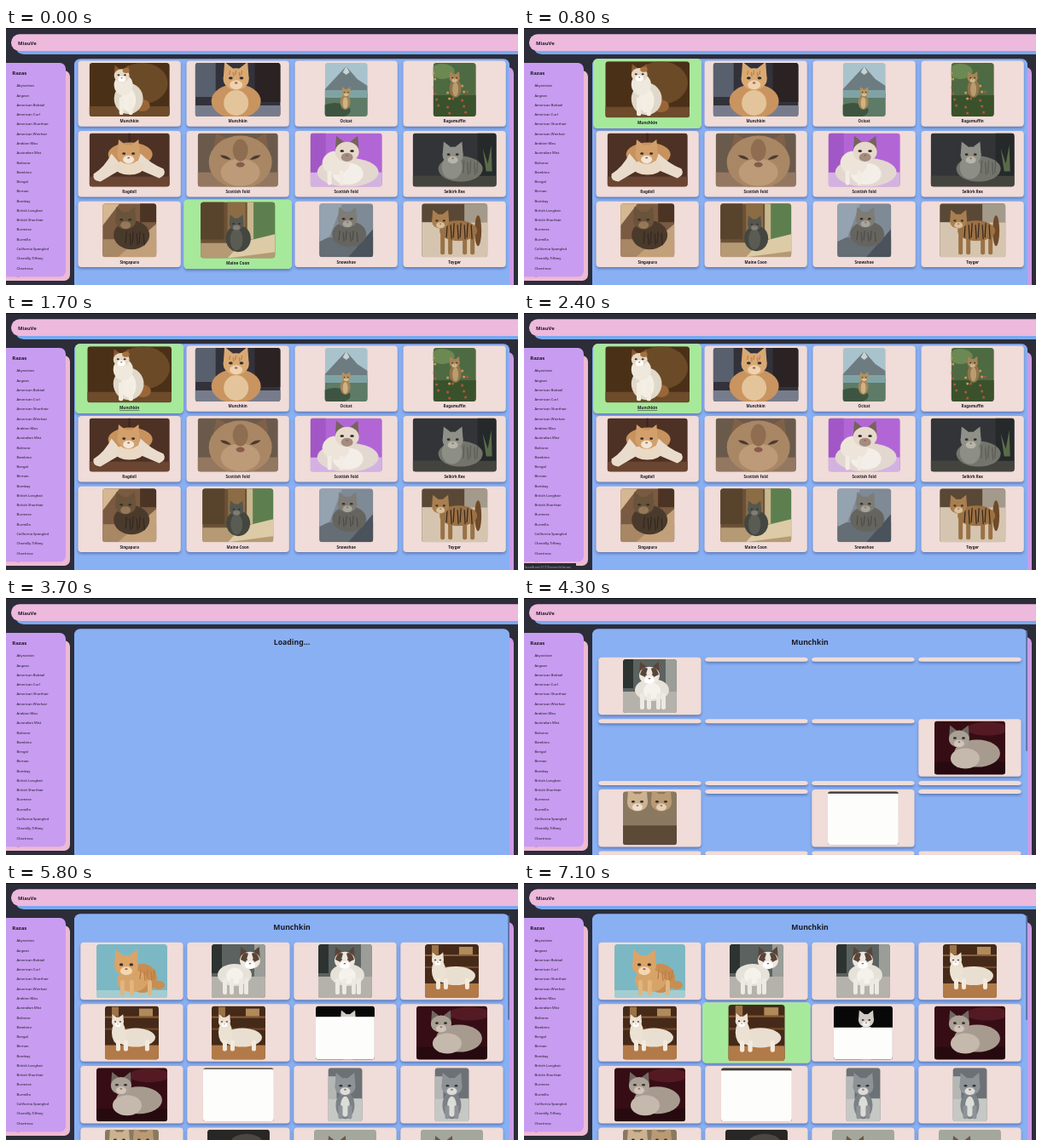
Recreate the animation shown at these times as an HTML page. Size 600 px wide and 302 px high, loop 8 s.

```html
<!DOCTYPE html>
<html lang="es">
<head>
<meta charset="utf-8">
<title>MiauVe</title>
<style>
  html, body { margin: 0; width: 100%; height: 100%; overflow: hidden; background: #2c2d39; }
  svg { display: block; width: 600px; height: 302px; font-family: "Noto Sans", "Open Sans", sans-serif; fill: #1b1a24; }
  .shadow { filter: drop-shadow(0 2px 1.6px rgba(30, 45, 100, .4)); }
  .label { font-size: 4.45px; font-weight: 600; text-anchor: middle; }
  .title { font-size: 8.7px; font-weight: 700; text-anchor: middle; }
  .breed { font-size: 4.1px; }
</style>
</head>
<body>
<svg id="stage" viewBox="0 0 600 302">
  <defs id="defs"></defs>
  <g id="frame"></g>
  <g id="view"></g>
</svg>
<script>
const PHOTO_H = 63;
const $ = id => document.getElementById(id);
const clamp = v => Math.max(0, Math.min(1, v));
const ease = (t, start, len = 200) => {
  const k = clamp((t - start) / len);
  return k * k * (3 - 2 * k);
};

const rect = (x, y, w, h, fill, r = 0, extra = '') =>
  `<rect x="${x}" y="${y}" width="${w}" height="${h}" rx="${r}" fill="${fill}" ${extra}/>`;
const oval = (fill, x, y, rx, ry = rx) =>
  `<ellipse cx="${x}" cy="${y}" rx="${rx}" ry="${ry}" fill="${fill}"/>`;
const shape = (fill, d) => `<path d="${d}" fill="${fill}"/>`;
const text = (x, y, s, cls, extra = '') => `<text x="${x}" y="${y}" class="${cls}" ${extra}>${s}</text>`;

// A wall down to the given height, then a floor
const room = (wall, floor, y) => rect(0, 0, 100, 63, wall) + rect(0, y, 100, 63 - y, floor);

const stripes = (color, x, y, n, step, len) => {
  let d = '';
  for (let i = 0; i < n; i++) d += `M${x + i * step} ${y + i % 2 * 2}l${i % 2 ? 1 : -1} ${len}`;
  return `<path d="${d}" stroke="${color}" stroke-width="1.3" fill="none"/>`;
};

const head = (fur, light, x, y, r, ear = fur) =>
  shape(ear, `M${x - r} ${y}l${r * .1} ${-r * 1.35}l${r * .75} ${r * .6}zM${x + r} ${y}l${-r * .1} ${-r * 1.35}l${-r * .75} ${r * .6}z`) +
  oval(fur, x, y, r, r * .85) +
  oval(light, x, y + r * .45, r * .5, r * .36) +
  oval('#36302a', x - r * .42, y - r * .08, r * .16, r * .11) +
  oval('#36302a', x + r * .42, y - r * .08, r * .16, r * .11) +
  oval('#a06b60', x, y + r * .3, r * .12, r * .08);

const body = (fur, light, x, y, rx, ry) =>
  oval(fur, x, y, rx, ry) + oval(light, x, y + ry * .1, rx * .5, ry * .75);

const legs = (fur, y, len, ...xs) => xs.map(x => rect(x, y, 5, len, fur, 2)).join('');

const blooms = (color, n, y) => Array.from({ length: n }, (_, i) =>
  oval(color, i * 17 % 49, y + i * 23 % 31, 1.6)).join('');

const whiteCat = (x, bodyX) => room('#5b625f', '#b5b2ab', 38) +
  rect(0, 0, 12, 34, '#2c3330') + rect(50, 0, 13, 38, '#9a9d98') +
  body('#e6e2da', '#f5f2ec', bodyX, 36, 20, 13) + legs('#eeeae2', 40, 19, bodyX - 14, bodyX - 6, bodyX + 5, bodyX + 11) +
  head('#ece7df', '#fff', x, 19, 12, '#594538') +
  shape('#594538', `M${x - 11} 18q3 -11 9 -7l-3 10zM${x + 11} 18q-3 -11 -9 -7l3 10z`);

// Each photo: width, then its drawing
const photos = {
  calicoSit: [94, room('#4b3018', '#6d4b2b', 51) + oval('#6b4a27', 62, 24, 30, 24) +
    oval('#9a6638', 62, 50, 9, 7) + body('#e0d8ca', '#f4efe4', 46, 42, 17, 18) + oval('#efe8dc', 40, 26, 11, 12) +
    head('#e5d8c4', '#fff', 38, 15, 9, '#8c5a30') + oval('#a4703e', 43, 9, 4, 3) + legs('#f2ece1', 40, 21, 35, 46)],
  ginger: [100, room('#33323a', '#777c8c', 50) + rect(0, 0, 24, 40, '#59606d') + rect(70, 0, 30, 46, '#2a2223') +
    body('#c9945f', '#e4c49a', 48, 45, 29, 20) + head('#d9a973', '#efd3ae', 48, 19, 15) +
    stripes('#b98350', 41, 9, 5, 3.5, 5)],
  lake: [50, room('#a9c3cd', '#5d7b66', 36) + shape('#6d7c80', 'M0 31L12 18 25 4 38 19 50 27V36H0z') +
    shape('#c9d2d3', 'M25 4l4 7-4 3-4-3z') + rect(0, 32, 50, 9, '#7fa3a5') +
    oval('#3d5540', 12, 56, 18, 9) + body('#a58458', '#cdb386', 24, 46, 6, 9) + head('#b5915f', '#d9c69d', 25, 35, 5)],
  meadow: [50, room('#4e6a42', '#39522b', 38) + oval('#6c8853', 11, 10, 14, 9) + blooms('#b0553c', 12, 29) + blooms('#c39a58', 6, 12) +
    body('#92734c', '#b99d6f', 26, 30, 7, 11) + head('#a68456', '#cdb78c', 25, 18, 6)],
  couch: [94, room('#4d3124', '#6a4532', 51) + rect(46, 0, 2, 18, '#3a241c') +
    oval('#c8925e', 48, 25, 26, 14) + shape('#e9dccd', 'M26 24Q18 40 5 48q-2 8 8 9L40 41zM60 24q12 12 27 18q4 7-5 11L54 41z') +
    oval('#ead9c4', 47, 40, 17, 9) + head('#d3a06c', '#f2e6d6', 46, 25, 13)],
  closeup: [94, room('#6a5a4b', '#937760', 46) + shape('#806048', 'M16 30L22 0l22 12zM84 30L80 0 58 12z') +
    oval('#a98765', 50, 34, 37, 31) + oval('#bd9b78', 50, 46, 23, 16) + oval('#8e6d50', 50, 20, 9, 13) +
    shape('#4d3a2c', 'M26 26q8 -1 13 5q-8 1-13-5zM74 26q-8 -1-13 5q8 1 13-5z') + oval('#8a5a4c', 50, 37, 5, 3)],
  seal: [84, room('#b266d6', '#d3b2e2', 46) + rect(0, 0, 18, 46, '#a257c6') +
    body('#e2d8cf', '#f4eee8', 44, 46, 36, 17) + oval('#ede4da', 30, 35, 16, 14) +
    head('#e6d9cb', '#a28d80', 43, 22, 14, '#75635b') + legs('#f3ece5', 44, 17, 20, 34)],
  smoke: [98, room('#323438', '#44443f', 50) + rect(76, 0, 22, 50, '#25292a') +
    shape('#5a6b4a', 'M86 45L82 18l6 18 4-22 1 31z') + oval('#73756d', 56, 42, 26, 15) + oval('#8d8e86', 46, 40, 12, 14) +
    head('#8f9087', '#b7b6ab', 47, 26, 12) + stripes('#5b5d56', 60, 32, 5, 4, 15)],
  woodTabby: [63, room('#7a5a40', '#a88765', 42) + shape('#d5b791', 'M0 0h20L0 26z') + shape('#c2a07a', 'M63 24v39H18z') +
    rect(44, 0, 19, 22, '#4b3424') + oval('#4a3a2c', 34, 37, 21, 17) +
    head('#69533b', '#947a58', 27, 20, 12) + stripes('#332820', 28, 33, 6, 4, 14)],
  doorway: [83, room('#6a5136', '#b59a74', 46) + rect(0, 0, 26, 42, '#58432c') + rect(56, 0, 27, 46, '#5d7f4f') +
    rect(30, 0, 20, 38, '#8b6c45') + rect(52, 0, 7, 42, '#c9b78f') + shape('#dccba6', 'M46 45L83 36v20L30 63z') +
    oval('#444640', 42, 41, 14, 15) + oval('#5a5c54', 40, 42, 7, 12) + head('#55574f', '#7d7f75', 40, 25, 8)],
  rocks: [63, room('#7e8a96', '#656d75', 40) + shape('#95a2af', 'M0 0h27L12 39 0 45z') + shape('#4a535b', 'M34 63L63 30v33z') +
    oval('#66645f', 35, 36, 20, 15) + head('#7e7c75', '#a8a59b', 33, 19, 11) + stripes('#4d4c47', 24, 32, 6, 4, 11)],
  striped: [77, room('#5a4836', '#d5c5b0', 22) + rect(50, 0, 27, 22, '#a39a8b') + oval('#6f4a29', 66, 32, 4, 18) +
    oval('#9b7145', 43, 32, 22, 12) + legs('#9b7145', 34, 26, 22, 31, 48, 57) +
    stripes('#3a2a1d', 30, 23, 8, 4, 17) + head('#a97f50', '#d8c09a', 22, 21, 10)],
  teal: [83, room('#7bb8c3', '#a3cdd0', 54) + oval('#c98d51', 54, 40, 17, 17) + oval('#d6a469', 42, 43, 18, 13) +
    legs('#e2b57e', 42, 18, 28, 39, 60) + oval('#c98d51', 73, 48, 7, 5) +
    head('#dba468', '#f2d7b0', 35, 25, 14) + stripes('#b97c44', 52, 30, 5, 4, 11)],
  whiteA: [63, whiteCat(45, 27)],
  whiteB: [63, whiteCat(31, 34)],
  loaf: [63, room('#452a19', '#b27a48', 46) + rect(0, 12, 63, 2, '#8a5c36') + rect(0, 26, 63, 2, '#75492a') +
    rect(8, 1, 8, 11, '#9b7347') + rect(40, 3, 16, 9, '#b08a5a') +
    oval('#e9dfd1', 36, 37, 23, 11) + oval('#ece2d3', 16, 31, 8, 14) + legs('#f3eadd', 40, 13, 13, 22, 47) + head('#ece1d3', '#fff', 15, 19, 7)],
  maroon: [83, room('#360d14', '#260a0f', 48) + oval('#541a24', 62, 9, 24, 8) +
    oval('#a79b8f', 50, 38, 27, 16) + oval('#c4b9ac', 36, 44, 17, 12) + head('#aaa096', '#cfc5ba', 29, 21, 12, '#6f6861')],
  calico: [73, room('#a3a79c', '#8d877b', 36) + rect(0, 22, 73, 14, '#6d7369') +
    oval('#d6cbbd', 40, 39, 21, 13) + oval('#76563d', 49, 33, 11, 7) + legs('#e8ded1', 40, 19, 22, 32, 52) +
    head('#d3bfa5', '#f4ede3', 27, 22, 11, '#755640') + oval('#595047', 22, 16, 5, 4)],
  curl: [40, room('#6c7175', '#c6c8c5', 36) + rect(0, 10, 10, 26, '#b4b7b5') + body('#7b8186', '#dcdcd8', 20, 44, 11, 16) +
    legs('#8d9397', 44, 16, 12, 23) + head('#8d9397', '#dddcd8', 20, 22, 12)],
  night: [69, room('#080808', '#151515', 50) + body('#c4c0b9', '#e4e1da', 38, 44, 13, 21) + head('#d0ccc5', '#eee', 38, 17, 9)],
  peek: [63, room('#c3c3bd', '#dddcd6', 40) + head('#22221f', '#777', 12, 10, 8)],
  faces: [63, room('#8a7960', '#5c4936', 40) + head('#cdb291', '#eee0ce', 17, 13, 12) + head('#b99a75', '#e5d0b5', 45, 13, 12)],
  rug: [93, room('#50261b', '#71402d', 30) + oval('#2b1b17', 50, 14, 30, 10) + oval('#8f6246', 23, 7, 12, 5)],
  dusk: [73, room('#282725', '#57504a', 30) + oval('#4a4641', 46, 14, 18, 9)],
  plain: [83, room('#3f3a35', '#57504a', 30)],
};

$('defs').innerHTML = [...new Set(Object.values(photos).map(p => p[0]))].map(w =>
  `<clipPath id="clip${w}">${rect(0, 0, w, PHOTO_H, '#000', 3.5)}</clipPath>`).join('');

// A photo centred on cx; the part not yet loaded stays white
function photo(name, cx, y, shown = 1) {
  const [w, art] = photos[name];
  const cut = PHOTO_H * shown;
  return `<g transform="translate(${cx - w / 2} ${y})" clip-path="url(#clip${w})">${art}` +
    (shown < 1 ? rect(0, cut, w, PHOTO_H - cut, '#fdfdfc') : '') + '</g>';
}

function card(x, y, h, inner, tint = 0, grow = tint) {
  const w = 120.3, cx = x + w / 2, cy = y + h / 2;
  return `<g transform="translate(${cx} ${cy}) scale(${1 + .05 * grow}) translate(${-cx} ${-cy})">` +
    rect(x, y, w, h, '#f0dcd8', 4, 'class="shadow"') +
    (tint ? rect(x, y, w, h, '#a6e99b', 4, `opacity="${tint}"`) : '') + inner + '</g>';
}

const home = [
  ['calicoSit', 'Munchkin'], ['ginger', 'Munchkin'], ['lake', 'Ocicat'], ['meadow', 'Ragamuffin'],
  ['couch', 'Ragdoll'], ['closeup', 'Scottish Fold'], ['seal', 'Scottish Fold'], ['smoke', 'Selkirk Rex'],
  ['woodTabby', 'Singapura'], ['doorway', 'Maine Coon'], ['rocks', 'Snowshoe'], ['striped', 'Toyger'],
];

function homeView(t) {
  const hover = { 0: ease(t, 400), 9: 1 - ease(t, 100) };
  const status = t >= 1900
    ? rect(0, 294, 61, 8, '#2b2b33') + text(1, 299.6, 'localhost:5173/search/munc', 'breed', 'fill="#a3a2a8"') : '';
  return home.map(([name, label], i) => {
    const x = 84.5 + i % 4 * 127, y = 38.5 + (i >> 2) * 82.6, cx = x + 60.15;
    const line = i === 0 && t >= 1500 ? 'text-decoration="underline"' : '';
    return card(x, y, 77.3, photo(name, cx, y + 2.5) + text(cx, y + 72.9, label, 'label', line), hover[i]);
  }).join('') + status;
}

// Name and loaded share; a dash is a card without a picture
const split = s => s.split(' ').map(p => p.split(':'));
const firstLoad = split('whiteB whiteA loaf loaf - - - maroon peek:.13 - curl:.5 calico faces rug plain:.04 curl');
const lateLoad = split('teal whiteA whiteB loaf loaf loaf night:.4 maroon maroon plain:.05 curl curl faces dusk calico calico');

function resultsView(t) {
  const late = t >= 5600;
  const list = late ? lateLoad : firstLoad;
  const loadAt = i => late ? 5600 + Math.min(i >> 2, 2) * 100 : 4200 + i * 3 % 7 * 100;
  const ready = i => list[i] && list[i][0] !== '-' && (late || t >= loadAt(i));
  let out = text(335, 55.2, 'Munchkin', 'title');
  let y = 69.7;
  for (let row = 0; row < 7; row++) {
    let rowH = 5;
    for (let col = 0; col < 4; col++) {
      const i = row * 4 + col, x = 87.3 + col * 125;
      const full = ready(i), h = full ? 67.5 : 5;
      let inner = '';
      if (full) {
        const [name, share = 1] = list[i];
        const shown = t < loadAt(i) ? .5 : late && +share < 1 && t < 6000 ? share / 2 : +share;
        inner = photo(name, x + 60.15, y + 2.3, shown);
      }
      const on = late && i === 5 && t >= 6800;
      out += card(x, y, h, inner, on ? 1 : 0, on ? ease(t, 6800) : 0);
      rowH = Math.max(rowH, h);
    }
    y += rowH + 5.1;
  }
  return out + (t >= 4200 ? rect(588.3, 38, 1.5, late ? 123 : 142, '#55658e', .7) : '');
}

const breeds = ['Abyssinian', 'Aegean', 'American Bobtail', 'American Curl', 'American Shorthair',
  'American Wirehair', 'Arabian Mau', 'Australian Mist', 'Balinese', 'Bambino', 'Bengal', 'Birman',
  'Bombay', 'British Longhair', 'British Shorthair', 'Burmese', 'Burmilla', 'California Spangled',
  'Chantilly-Tiffany', 'Chartreux', 'Chausie'];

$('frame').innerHTML =
  rect(0, 0, 600, 302, '#2c2d39') + rect(0, 0, 600, 1, '#15151b') +
  rect(11, 11, 600, 20, '#78a9ee', 9.8) + rect(6, 7.3, 610, 19.7, '#edb9dd', 9.8) +
  text(14, 19.5, 'MiauVe', '', 'font-size="5.8" font-weight="700"') +
  rect(-20, 50, 95, 247, '#edb9d3', 7) + rect(-20, 41, 90, 251.5, '#c89cf0', 7) +
  text(7.2, 55.4, 'Razas', '', 'font-size="6" font-weight="700"') +
  breeds.map((b, i) => text(12.5, 69.4 + i * 11.27, b, 'breed')).join('') +
  rect(0, 292.5, 69, 4.5, '#edb9d3') +
  rect(85, 46, 510, 270, '#cb9be4', 7) + rect(80, 36.3, 510, 280, '#89b0f3', 7);

const scene = t =>
  t < 2500 ? homeView(t) :
  t < 4000 ? text(335, 55.2, 'Loading...', 'title') :
  resultsView(t);

let last = '';
function tick() {
  const html = scene(performance.now() % 8000);
  if (html !== last) $('view').innerHTML = last = html;
  requestAnimationFrame(tick);
}
tick();
</script>
</body>
</html>
```
